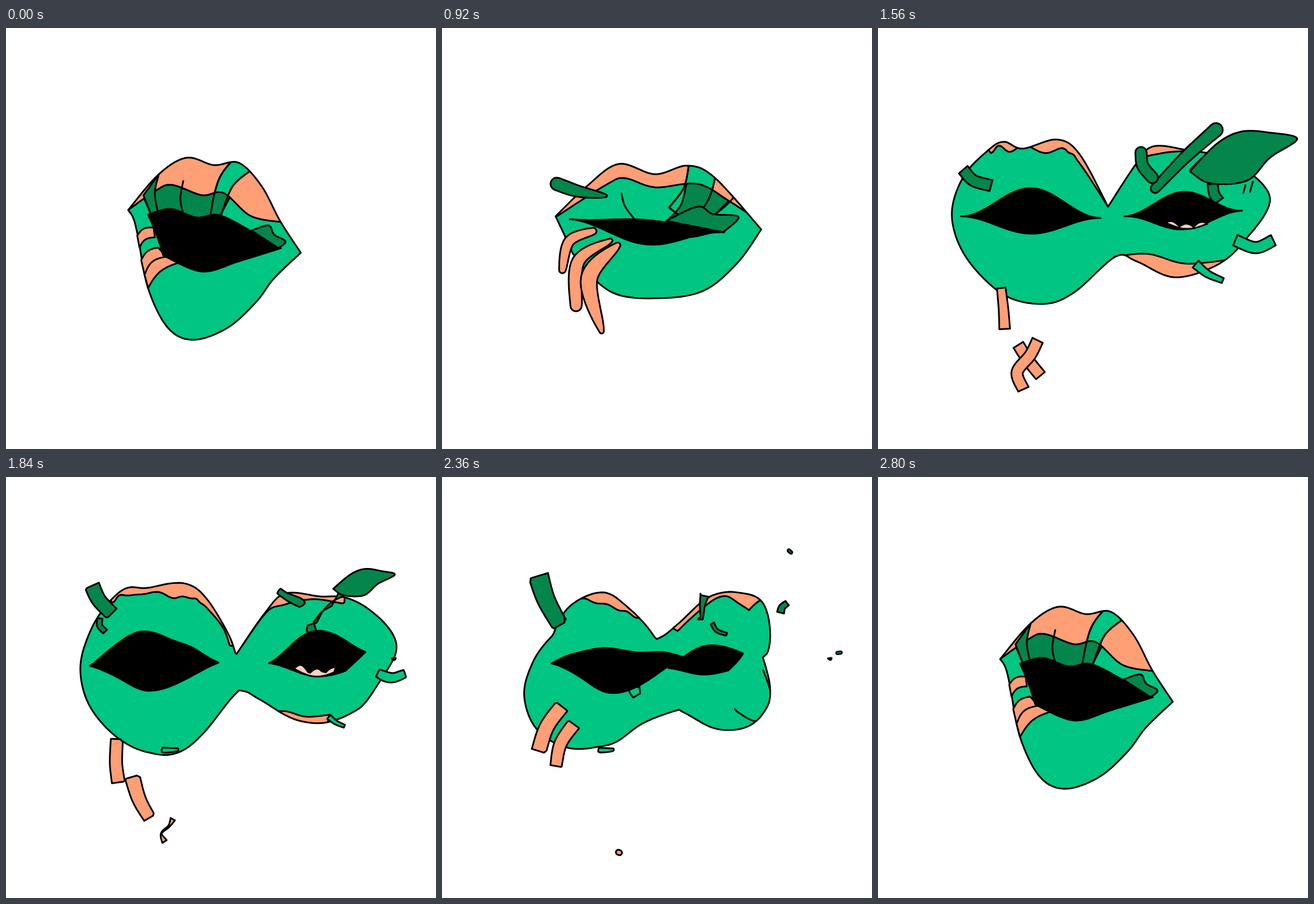
These frames come from a looping animation (757 by 740 pixels, 2840 ms). An HTML page with a canvas:

```html
<!DOCTYPE html>
<html lang="en">
<head>
<meta charset="utf-8">
<title>Talking lips</title>
<style>
  html, body { margin: 0; width: 100%; height: 100%; overflow: hidden; background: #fff; }
  canvas { display: block; }
</style>
</head>
<body>
<canvas id="stage" width="757" height="740"></canvas>
<script>
const ctx = document.getElementById('stage').getContext('2d');
const LOOP = 2840;
const KEYS = [0, 440, 920, 1560, 2120, 2520, 2800];
const COLORS = { g: '#00c583', d: '#03854b', o: '#ff9f76', k: '#000', p: '#ffcfc2' };

const mix = (a, b, u) => a + (b - a) * u;
const range = (n, f) => Array.from({ length: n + 1 }, (_, i) => f(i / n));
const close = line => [...line, line[0]];

// Smooth curve through a few points; "!" marks a corner.
function curve(text, closed) {
  const pts = text.split(' ').map(s => {
    const [x, y] = s.split(',').map(parseFloat);
    return { x, y, corner: s.endsWith('!') };
  });
  const n = pts.length, out = [];
  if (!closed) pts[0].corner = pts[n - 1].corner = true;
  for (let i = 0; i < (closed ? n : n - 1); i++) {
    const b = pts[i], c = pts[(i + 1) % n];
    const a = b.corner ? b : pts[(i + n - 1) % n];
    const d = c.corner ? c : pts[(i + 2) % n];
    const at = (k, u) => b[k] + u * (c[k] - a[k]) / 2 +
      u * u * (a[k] - 2.5 * b[k] + 2 * c[k] - d[k] / 2) +
      u * u * u * (1.5 * (b[k] - c[k]) + (d[k] - a[k]) / 2);
    for (let j = 0; j < 12; j++) out.push([at('x', j / 12), at('y', j / 12)]);
  }
  const end = pts[closed ? 0 : n - 1];
  out.push([end.x, end.y]);
  return out;
}
const loop = text => curve(text, true);

// Band of a given width along a curve.
function strip(text, w0, w1 = w0, bulge = 0, round = false) {
  const mid = curve(text), last = mid.length - 1;
  const sides = mid.map(([x, y], i) => {
    const a = mid[Math.max(i - 1, 0)], b = mid[Math.min(i + 1, last)];
    const dir = Math.atan2(b[1] - a[1], b[0] - a[0]), s = i / last;
    const r = (mix(w0, w1, s) + bulge * Math.sin(Math.PI * s)) / 2;
    return turn => [x + r * Math.sin(dir + turn), y - r * Math.cos(dir + turn)];
  });
  const cap = (i, from) => round ? range(8, s => sides[i](from + Math.PI * s)) : [];
  return close([...sides.map(f => f(0)), ...cap(last, 0),
    ...sides.map(f => f(Math.PI)).reverse(), ...cap(0, Math.PI)]);
}
const sausage = (text, w0, w1, bulge) => strip(text, w0, w1, bulge, true);

// Four corners with the two long edges bowed upwards.
function stripe(text, bow = 6) {
  const [a, b, c, d] = text.split(' ').map(s => s.split(',').map(Number));
  const edge = (p, q) => {
    const len = Math.hypot(q[0] - p[0], q[1] - p[1]);
    return range(12, s => {
      const k = bow * Math.sin(Math.PI * s) / len;
      return [mix(p[0], q[0], s) + k * (q[1] - p[1]), mix(p[1], q[1], s) - k * (q[0] - p[0])];
    });
  };
  return close([...edge(a, b), ...edge(d, c).reverse()]);
}

function lens(x0, y0, x1, y1, up, down) {
  const side = h => range(40, s =>
    [mix(x0, x1, s), mix(y0, y1, s) + h * Math.sin(Math.PI * s) ** 2]);
  return [...side(-up), ...side(down).reverse()];
}

function teeth(x0, y0, x1, y1, h, sag) {
  const side = (k, bump) => range(48, s => [mix(x0, x1, s),
    mix(y0, y1, s) + k * sag * Math.sin(Math.PI * s) - bump * Math.abs(Math.sin(3 * Math.PI * s))]);
  return close([...side(0.7, h), ...side(1, 0).reverse()]);
}

// Drips along the first share of a line.
const ripple = (line, waves, amp, share) => line.map(([x, y], i) => {
  const s = i / (line.length - 1) / share;
  return [x, s < 1 ? y + amp * Math.sin(2 * Math.PI * waves * s) : y];
});

// Everything above a lip line; the body clips the rest.
const above = line => close([...line, [line[line.length - 1][0], 140], [line[0][0], 140]]);
const under = (line, x0, x1, rest) =>
  close([...line.filter(p => p[0] >= x0 && p[0] <= x1), ...curve(rest)]);
const band = line => ({ gBand: line, lBand: line });

const lip0 = curve('215,320 265,285 293,276 345,294 383,290 430,330 483,341');
const lip1 = curve('262,270! 272,278! 308,246 345,254 388,251 416,276 465,315');
const lip2 = curve('202,331 290,275 322,264 375,280 450,274 505,304 545,330');
const lip3 = curve('195,214 240,212 330,218 355,238 405,314! 455,238 500,220 552,216');
const lip4 = curve('170,222 215,198 300,200 350,225 397,270 404,312! 440,260 490,206 530,214 590,209 655,235');
const lip5 = curve('232,228 265,224 335,262 375,272 440,232 490,209 518,225 527,250');

// The first letter of a part is its colour (l = line only).
const INNER = 'oLip oLow gBand dTop lBand lCrease lEdge lLeft lRight lDrip dV'.split(' ');
const OUTER = ('dC dB dT oS1 oS2 oS3 kM kN pTop pTeeth lCorner lFold dBlob dA ' +
  'gE gF gH oW lTick1 lTick2').split(' ');

const POSES = [{
  gBody: loop('215,320! 269,257 318,228 366,241 410,237 450,278 483,340 519,395! 472,440 440,482 390,527 330,548 285,527 250,457 232,365 224,334'),
  oLip: above(lip0),
  dTop: under(lip0, 243, 394, '377,330 300,345! 256,330'),
  ...band(strip('425,232 388,270 368,332', 38, 17)),
  lCrease: curve('312,269 307,300 312,327'),
  dT: loop('242,294! 269,257! 262,290 267,322! 256,330!'),
  oS1: stripe('231,365 260,351 262,368 235,386'),
  oS2: stripe('238,408 268,386 282,402 244,434'),
  oS3: stripe('244,434 282,402 306,412 250,457', 9),
  kM: loop('250,328! 290,318 335,333 375,329 430,356 484,387! 410,410 345,428 277,400! 264,360'),
  dBlob: loop('432,356! 462,347 472,363 492,375 480,387!')
}, {
  gBody: loop('218,323! 262,270 290,243 317,231 363,245 388,242 428,269 465,315 509,388 478,440 410,518 355,549 310,542 268,503 245,435 233,360'),
  oLip: above(lip1),
  dTop: under(lip1, 268, 456, '440,325 415,328! 360,330! 312,300'),
  ...band(strip('424,251 397,280 386,308', 30, 16)),
  lCrease: curve('316,256 320,285 333,298'),
  dT: loop('241,296! 262,270! 285,288 312,298! 275,303'),
  oS1: stripe('235,370 256,356 263,371 238,386'),
  oS2: stripe('242,410 270,389 277,417 247,440'),
  oS3: stripe('247,440 277,417 284,433 252,462'),
  kM: loop('248,342! 300,301 352,293 412,328 470,390! 400,464 345,492 297,460 270,385'),
  dBlob: loop('432,344! 468,348 473,362 490,383 470,390!')
}, {
  gBody: loop('200,331! 255,278 311,239 375,257 432,242 480,263 562,354! 520,413 460,462 380,475 300,465 240,410 217,367!'),
  oLip: above(lip2),
  dTop: under(lip2, 430, 505, '480,328! 395,340! 420,312 430,276'),
  ...band(strip('460,240 448,290 418,330', 50, 46)),
  lCrease: curve('316,291 322,313 338,335'),
  lEdge: curve('519,292 500,312 480,328'),
  dT: sausage('202,274 240,287 288,295', 22, 5, 6),
  oS1: sausage('212,425 224,375 266,357', 12, 12, 6),
  oS2: sausage('236,488 240,410 296,374', 20, 8, 8),
  oS3: sausage('281,533 259,440 309,382', 8, 10, 20),
  kM: lens(225, 336, 497, 359, 10, 33),
  kN: lens(370, 352, 490, 359, 5, 12),
  dBlob: loop('395,339! 450,314 477,327 522,332 495,359!')
}, {
  gBody: loop('130,330 150,262 195,214 222,200 255,212 315,196 355,222 405,314! 455,238 485,208 545,215 620,232 690,298 640,380 590,420 520,438 455,410 418,402 345,465 290,485 220,468 155,403'),
  oLip: above(ripple(lip3, 3, 6, 0.3)),
  oLow: loop('416,402! 475,397 540,414 612,408! 600,460! 430,460!'),
  dT: strip('150,249 168,268 199,277', 20),
  oS1: strip('223,529 221,495 217,457', 19, 15),
  oS2: strip('286,611 265,585 247,557', 20),
  oS3: strip('256,635 245,605 268,575 281,549', 20),
  kM: lens(146, 331, 392, 334, 51, 29),
  kN: lens(434, 331, 641, 321, 38, 28),
  pTeeth: teeth(506, 342, 580, 344, 6, 10),
  dBlob: loop('549,252! 597,203 640,182 690,184 738,195 690,228 650,268 585,273'),
  dA: sausage('463,219 466,242 483,263', 20),
  dB: sausage('488,282 540,228 595,179', 16, 24),
  dC: strip('589,274 592,292 600,304', 18),
  gE: strip('629,373 665,386 696,373', 20),
  gF: strip('559,415 580,432 607,444', 16, 9),
  lFold: curve('550,249 570,229 588,217'),
  lTick1: curve('643,290 647,276'),
  lTick2: curve('655,288 660,270')
}, {
  gBody: loop('132,350 145,290 175,217 222,179 285,169 340,192 395,268 404,312! 455,242 500,200 560,203 610,200 665,240 688,295 655,360 630,410 600,427 545,436 485,403 410,348 392,352 320,480 260,492 195,470 145,415'),
  oLip: above(ripple(lip4, 5, 5, 0.3)),
  lLeft: strip('570,335 556,388 570,440', 27),
  lRight: strip('612,328 626,358 642,394', 14, 30),
  lDrip: ripple(curve('630,235 650,252 669,260'), 3.5, -17, 1),
  dV: strip('162,232 162,262 184,286', 22),
  dT: strip('152,113 158,150 170,189', 39, 37),
  oS1: strip('164,547 157,510 165,466', 28),
  oS2: strip('207,583 191,540 189,489', 22, 34),
  oS3: sausage('309,659 314,661', 22),
  kM: loop('150,333! 165,292 215,255 270,277 315,282 352,314! 305,362 240,396 190,362'),
  kN: loop('502,322! 530,265 560,246 597,258 627,300 620,340! 560,345'),
  pTop: loop('213,251! 262,267 292,265 314,282! 265,279'),
  pTeeth: teeth(508, 330, 592, 336, 18, 15),
  lCorner: curve('651,320 620,332 590,338'),
  dBlob: sausage('608,127 617,135', 12),
  dA: strip('502,181 540,170 579,168', 29),
  dB: strip('619,210 597,228 590,252', 24, 32),
  dC: strip('460,240 480,272 523,288', 17, 13),
  gE: sausage('692,310 706,308', 11),
  gH: loop('258,470! 323,473! 318,485 260,490'),
  oW: loop('674,318! 690,316 685,325')
}, {
  gBody: loop('153,405 170,352 208,320! 215,262 258,217 305,234 360,267 400,255 445,222 490,202 528,235 500,310 486,318! 530,350 549,405 527,455 485,476 430,456 355,435 300,452 235,475 180,458'),
  oLip: above(lip5),
  lLeft: curve('208,320 190,350 186,390'),
  lRight: curve('530,350 537,390 525,435 500,467 447,463'),
  dV: strip('208,295 219,250 248,222', 14),
  dT: strip('181,214 200,260 234,308', 34, 23),
  oS1: strip('174,437 205,392 242,362', 26),
  oS2: strip('197,459 222,422 262,399', 24),
  kM: lens(221, 324, 477, 324, -7, 47),
  kN: lens(330, 345, 470, 326, 5, 12),
  dA: strip('434,226 402,265 372,310', 42, 18)
}];

// Evenly spaced points along a polyline.
function resample(line, count = 240) {
  const len = [0];
  for (let i = 1; i < line.length; i++)
    len.push(len[i - 1] + Math.hypot(line[i][0] - line[i - 1][0], line[i][1] - line[i - 1][1]));
  const total = len[len.length - 1];
  let i = 1;
  return range(count - 1, s => {
    while (i < line.length - 1 && len[i] < total * s) i++;
    const u = (total * s - len[i - 1]) / (len[i] - len[i - 1] || 1);
    return [mix(line[i - 1][0], line[i][0], u), mix(line[i - 1][1], line[i][1], u)];
  });
}

const shapes = POSES.map(pose => Object.fromEntries(Object.entries(pose).map(([id, line]) => {
  const even = resample(line);
  const mid = [0, 1].map(k => even.reduce((sum, p) => sum + p[k], 0) / even.length);
  return [id, { line, even, mid }];
})));

const shrink = (s, k) => s.even.map(p => [mix(s.mid[0], p[0], k), mix(s.mid[1], p[1], k)]);

// Shared parts blend, loose pieces grow or shrink, small details vanish.
function morph(id, from, to, u) {
  const a = from[id], b = to[id];
  if (u === 0) return a && a.line;
  if (a && b) return a.even.map((p, i) => [mix(p[0], b.even[i][0], u), mix(p[1], b.even[i][1], u)]);
  if ('lp'.includes(id[0])) return null;
  if (a) return shrink(a, 1 - u);
  return b && shrink(b, u);
}

function trace(pts) {
  const path = new Path2D();
  pts.forEach(p => path.lineTo(p[0], p[1]));
  return path;
}

// Poses are held for 80 ms, with a few short holds.
function snap(t) {
  const hold = start => start + 80 * Math.floor((t - start) / 80);
  if (t < 40) return 0;
  if (t < 1680) return hold(40);
  if (t < 1800) return hold(1680);
  return t < 2800 ? Math.min(hold(1800), 2680) : 2800;
}

function draw(time) {
  const t = snap(time);
  let i = KEYS.length - 1;
  while (KEYS[i] > t) i--;
  const u = i < KEYS.length - 1 ? (t - KEYS[i]) / (KEYS[i + 1] - KEYS[i]) : 0;
  const from = shapes[i % shapes.length], to = shapes[(i + 1) % shapes.length];

  const part = id => {
    const pts = morph(id, from, to, u);
    if (!pts) return;
    const path = trace(pts);
    if (COLORS[id[0]]) {
      ctx.fillStyle = COLORS[id[0]];
      ctx.fill(path);
    }
    ctx.stroke(path);
  };

  ctx.setTransform(1, 0, 0, 1, 0, 0);
  ctx.fillStyle = '#fff';
  ctx.fillRect(0, 0, 757, 740);
  ctx.lineWidth = 3;
  ctx.lineJoin = ctx.lineCap = 'round';
  ctx.strokeStyle = '#000';

  if (i === 0) {
    const swell = Math.sin(Math.PI * u);
    ctx.translate(365, 388);
    ctx.scale(1 + 0.04 * swell, 1 + 0.17 * swell);
    ctx.translate(-365, -388);
  }

  const body = trace(morph('gBody', from, to, u));
  ctx.save();
  ctx.clip(body);
  ctx.fillStyle = COLORS.g;
  ctx.fill(body);
  INNER.forEach(part);
  ctx.restore();
  ctx.stroke(body);
  OUTER.forEach(part);
}

const start = performance.now();
function tick() {
  draw((performance.now() - start) % LOOP);
  requestAnimationFrame(tick);
}
tick();
</script>
</body>
</html>
```
